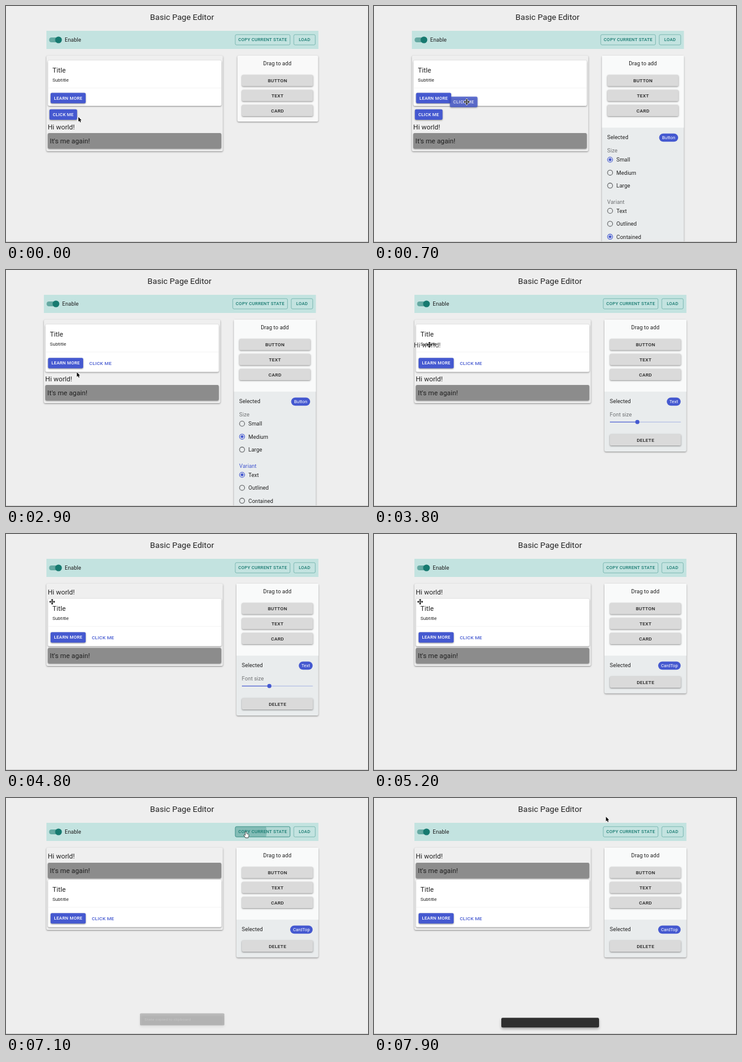
Animation, 600 px wide and 390 px high, one loop 8000 ms. Source, as an HTML page with a canvas:

```html
<!DOCTYPE html>
<html lang="en">
<head>
<meta charset="utf-8">
<title>Basic Page Editor</title>
<style>
html, body { margin: 0; width: 600px; height: 390px; overflow: hidden; background: #eee; }
canvas { display: block; width: 600px; height: 390px; }
</style>
</head>
<body>
<canvas id="stage"></canvas>
<script>
const LOOP = 8000, STEP = 100;
const BLUE = '#4559d0', TEAL = '#177a70', INK = '#212121', MUTED = '#707274';
const canvas = document.getElementById('stage');
const ctx = canvas.getContext('2d');
const dpr = window.devicePixelRatio || 1;
canvas.width = 600 * dpr;
canvas.height = 390 * dpr;

// Pointer path: time, x, y, shape
const path = [
  [0, 120, 183.5, 'arrow'], [200, 103, 181, 'move'], [300, 100, 180, 'move'],
  [800, 160, 156, 'move'], [900, 162, 156, 'arrow'], [1000, 170, 160, 'arrow'],
  [1400, 402, 262, 'hand'], [1500, 403, 265, 'hand'], [1700, 393, 275, 'hand'],
  [1900, 393, 277, 'hand'], [2200, 392, 338, 'hand'], [2400, 392, 338, 'arrow'],
  [2900, 117.5, 169, 'arrow'], [3100, 100, 179, 'move'], [3300, 96, 179, 'move'],
  [4100, 90, 98, 'move'], [4300, 88, 97, 'move'], [4500, 88, 97, 'move'],
  [4800, 76.5, 112, 'move'], [5200, 76.5, 112, 'move'], [5800, 94, 227, 'move'],
  [6200, 95, 228, 'move'], [6300, 96, 228, 'arrow'], [6800, 398, 62, 'hand'],
  [6900, 397, 56, 'hand'], [7400, 397, 56, 'hand'], [7600, 390, 46, 'arrow'],
  [7900, 384.5, 31, 'arrow']
];

const lerp = (a, b, p) => a + (b - a) * p;
const smooth = p => p * p * (3 - 2 * p);

function pointer(t) {
  let i = path.length - 1;
  while (path[i][0] > t) i--;
  const a = path[i], b = path[i + 1] || a;
  const p = b === a ? 0 : smooth((t - a[0]) / (b[0] - a[0]));
  return { x: lerp(a[1], b[1], p), y: lerp(a[2], b[2], p), shape: a[3] };
}

function box(x, y, w, h, fill, r = 0, shadow = 0) {
  ctx.save();
  if (shadow) {
    ctx.shadowColor = `rgba(0,0,0,${shadow > 3 ? 0.3 : 0.42})`;
    ctx.shadowBlur = shadow * dpr;
    ctx.shadowOffsetY = (shadow > 3 ? 2.5 : 1) * dpr;
  }
  ctx.fillStyle = fill;
  ctx.beginPath();
  ctx.roundRect(x, y, w, h, r);
  ctx.fill();
  ctx.restore();
}

function frame(x, y, w, h, color, r) {
  ctx.strokeStyle = color;
  ctx.lineWidth = 0.7;
  ctx.beginPath();
  ctx.roundRect(x, y, w, h, r);
  ctx.stroke();
}

function disc(x, y, r, fill) {
  ctx.fillStyle = fill;
  ctx.beginPath();
  ctx.arc(x, y, r, 0, 7);
  ctx.fill();
}

function text(s, x, y, size, color = INK, { weight = 400, align = 'left', gap = 0.04 } = {}) {
  ctx.font = `${weight} ${size}px Roboto, sans-serif`;
  ctx.letterSpacing = gap + 'px';
  ctx.textAlign = align;
  ctx.fillStyle = color;
  ctx.fillText(s, x, y);
}

const caps = (s, x, y, size, color, align = 'left') =>
  text(s, x, y, size, color, { weight: 500, align, gap: 0.25 });

function solidButton(label, x, cy, w, medium) {
  const h = medium ? 20.5 : 17.3;
  box(x, cy - h / 2, w, h, BLUE, 2.2, 2.5);
  caps(label, x + (medium ? 9 : 5.6), cy + 2.6, medium ? 7.9 : 7.3, '#fff');
}

function greyButton(label, y, h = 18.8) {
  box(391, y, 117.8, h, '#dadada', 2.2, 2.5);
  caps(label, 450, y + h / 2 + 2.9, 7.9, INK, 'center');
}

function clickMe(x, cy, s) {
  if (s.variant === 'Text') caps('CLICK ME', x + 4.2, cy + 2.7, 7.9, BLUE);
  else solidButton('CLICK ME', x, cy, s.medium ? 55 : 45.8, s.medium);
}

function card(x, y, s, shadow = 2.5) {
  const h = s.medium ? 78.5 : 75, cy = y + h / 2 + 24.6;
  box(x, y, 287.5, h, '#fff', 2.2, shadow);
  text('Title', x + 7.5, y + 20, 11.25);
  text('Subtitle', x + 7.5, y + 34.7, 7.9);
  box(x, y + 45, 287.5, 0.6, '#ebebeb');
  solidButton('LEARN MORE', x + 4.4, cy, 58.2, false);
  if (s.nested) clickMe(x + 68.5, cy, s);
}

function greyText(y) {
  box(69.3, y, 287.5, 25.5, '#8c8c8c', 2.2, 2);
  text("It's me again!", 72.8, y + 16.9, 11.25);
}

// Card top, first text baseline, grey block top, panel bottom
function layout(t, s) {
  if (t >= 6200) return [135, 100, 107, 218];
  if (t >= 4200) return [107, 100, 188.3, 218];
  if (s.medium) return [90, 183.5, 190, 220];
  if (s.nested) return [90, 180, 186.8, 216.8];
  return [90, 203.8, 210, 240];
}

function editor(t, s) {
  const [cardY, hiY, greyY, end] = layout(t, s);
  box(67, 82, 292.5, end - 82, '#efefef', 2.2, 2.5);
  text('Hi world!', 69.3, hiY, 11.25);
  greyText(greyY);
  card(69.5, cardY, s);
  if (!s.nested) clickMe(72, 179.3, s);
}

function header(t) {
  text('Basic Page Editor', 291.8, 22.6, 13.5, INK, { align: 'center' });
  box(67, 41, 450.8, 30, '#c3e3e0');
  box(71.5, 52, 19, 8, 'rgba(23,122,112,.55)', 4);
  disc(87, 56, 5.6, TEAL);
  text('Enable', 97.3, 59, 9);

  const hover = t >= 6800 && t < 7600;
  if (hover) box(380, 47.3, 90.8, 17, 'rgba(23,122,112,.1)', 2.2);
  if (t >= 7000 && t < 7500) {
    ctx.save();
    ctx.beginPath();
    ctx.roundRect(380, 47.3, 90.8, 17, 2.2);
    ctx.clip();
    ctx.globalAlpha = t <= 7200 ? 0.3 : 0.3 * (7500 - t) / 300;
    disc(397, 56, 12 + (t - 7000) * 0.23, TEAL);
    ctx.restore();
  }
  frame(380, 47.3, 90.8, 17, hover ? TEAL : 'rgba(23,122,112,.55)', 2.2);
  caps('COPY CURRENT STATE', 425.4, 58.4, 7.3, TEAL, 'center');
  frame(477, 47.3, 35.6, 17, 'rgba(23,122,112,.55)', 2.2);
  caps('LOAD', 494.8, 58.4, 7.3, TEAL, 'center');
}

function radios(name, y, options, chosen, active) {
  text(name, 390.8, y, 9, active ? BLUE : MUTED);
  options.forEach((label, i) => {
    const cy = y + 12 + i * 21.4, on = label === chosen;
    ctx.strokeStyle = on ? BLUE : '#606264';
    ctx.lineWidth = 1.1;
    ctx.beginPath();
    ctx.arc(395.5, cy, 4.2, 0, 7);
    ctx.stroke();
    if (on) disc(395.5, cy, 2.4, BLUE);
    text(label, 406, cy + 3.2, 9);
  });
}

function selection(s, t) {
  const wide = { Button: 31.5, Text: 23, CardTop: 37.3 }[s.pick];
  text('Selected', 390.8, 220.4, 9);
  box(508.3 - wide, 210.8, wide, 13.5, BLUE, 6.75);
  text(s.pick, 508.3 - wide / 2, 220.2, 7.3, '#fff', { align: 'center' });
  if (s.pick === 'Button') {
    radios('Size', 242, ['Small', 'Medium', 'Large'], s.medium ? 'Medium' : 'Small', s.medium && s.variant !== 'Text');
    radios('Variant', 326.5, ['Text', 'Outlined', 'Contained'], s.variant, s.variant === 'Text');
  } else if (s.pick === 'Text') {
    text('Font size', 390.8, 242, 9, MUTED);
    box(391, 250.7, 117.5, 1.1, 'rgba(69,89,208,.38)');
    box(391, 250.7, 45.5, 1.1, BLUE);
    disc(436.5, 251.2, 3.4, BLUE);
    greyButton('DELETE', 271.3);
  } else {
    greyButton('DELETE', 235.2);
  }
}

function toolbox(s, t) {
  if (s.pick) {
    const end = { Button: 430, Text: 300, CardTop: 263.5 }[s.pick];
    box(382, 82, 135.8, end - 82, '#e9eced', 2.2, 2.5);
    box(382, 82, 135.8, 119, '#f9fafa');
    selection(s, t);
  } else {
    box(383.5, 82, 134, 109, '#f9f9f9', 2.2, 2.5);
  }
  text('Drag to add', 449.7, 97.6, 9, INK, { align: 'center' });
  ['BUTTON', 'TEXT', 'CARD'].forEach((label, i) => greyButton(label, 113.7 + i * 24.8));
}

// Translucent copy carried by the pointer
function ghost(t, s, m) {
  ctx.save();
  ctx.globalAlpha = 0.8;
  if (t > 300 && t < 900) clickMe(m.x - 28, m.y, s);
  else if (t > 3300 && t < 4200) text('Hi world!', m.x - 26, m.y + 4.5, 11.25);
  else if (t > 5200 && t < 6200) card(m.x - 7, m.y - 5, s, 8);
  ctx.restore();
}

function snackbar(t) {
  if (t < 7100) return;
  const open = t < 7900, h = open ? 27 : 16;
  const p = Math.min(1, (t - 7000) / 220), k = 0.75 + 0.25 * p;
  ctx.save();
  ctx.globalAlpha = Math.pow(p, 1.8);
  ctx.translate(292, 379.3 - h / 2);
  ctx.scale(k, k * k);
  box(-81, -h / 2, 162, h, '#2f2f2f', 2.2, 4);
  if (open) text('State copied to clipboard', -72, 2.8, 7.9, '#fff');
  ctx.restore();
}

function poly(points, fill, line) {
  ctx.beginPath();
  points.forEach(([x, y]) => ctx.lineTo(x, y));
  ctx.closePath();
  ctx.lineJoin = 'round';
  ctx.strokeStyle = line;
  ctx.lineWidth = 1.1;
  ctx.stroke();
  ctx.fillStyle = fill;
  ctx.fill();
}

const shapes = {
  arrow() {
    poly([[0, 0], [0, 7.4], [1.7, 5.9], [3, 8.8], [4.2, 8.3], [3, 5.5], [5.2, 5.4]], '#000', '#fff');
  },
  hand() {
    poly([[0, 0], [1.3, 0], [1.6, 3.2], [4.6, 4], [5.3, 5], [4.8, 7.8], [4.2, 9.6],
      [0.4, 9.6], [-2.6, 5.9], [-1.8, 5.1], [-0.2, 6.2]], '#fff', '#111');
  },
  move() {
    for (const [color, width] of [['#fff', 2.6], ['#111', 1.2]]) {
      ctx.strokeStyle = color;
      ctx.lineWidth = width;
      ctx.beginPath();
      for (const [dx, dy] of [[1, 0], [-1, 0], [0, 1], [0, -1]]) {
        ctx.moveTo(0, 0);
        ctx.lineTo(dx * 3.9, dy * 3.9);
        ctx.moveTo(dx * 2.6 + dy * 1.4, dy * 2.6 + dx * 1.4);
        ctx.lineTo(dx * 4, dy * 4);
        ctx.lineTo(dx * 2.6 - dy * 1.4, dy * 2.6 - dx * 1.4);
      }
      ctx.stroke();
    }
  }
};

function draw(t) {
  const s = {
    pick: t < 300 ? '' : t < 3300 ? 'Button' : t < 5200 ? 'Text' : 'CardTop',
    nested: t >= 900,
    medium: t >= 1800,
    variant: t >= 2300 ? 'Text' : 'Contained'
  };
  const m = pointer(t);
  ctx.setTransform(dpr, 0, 0, dpr, 0, 0);
  box(0, 0, 600, 390, '#eeeeee');
  ctx.save();
  // The page scrollbar narrows the layout while the long panel is open
  if (s.pick === 'Button') ctx.translate(-4.2, 0);
  header(t);
  editor(t, s);
  toolbox(s, t);
  ctx.restore();
  ghost(t, s, m);
  snackbar(t);
  box(0, 389, 600, 1, '#cbcbcb');
  ctx.save();
  ctx.translate(m.x, m.y);
  shapes[m.shape]();
  ctx.restore();
}

const start = performance.now();
function tick() {
  const t = (performance.now() - start) % LOOP;
  draw(Math.floor(t / STEP) * STEP);
  requestAnimationFrame(tick);
}
tick();
</script>
</body>
</html>
```
